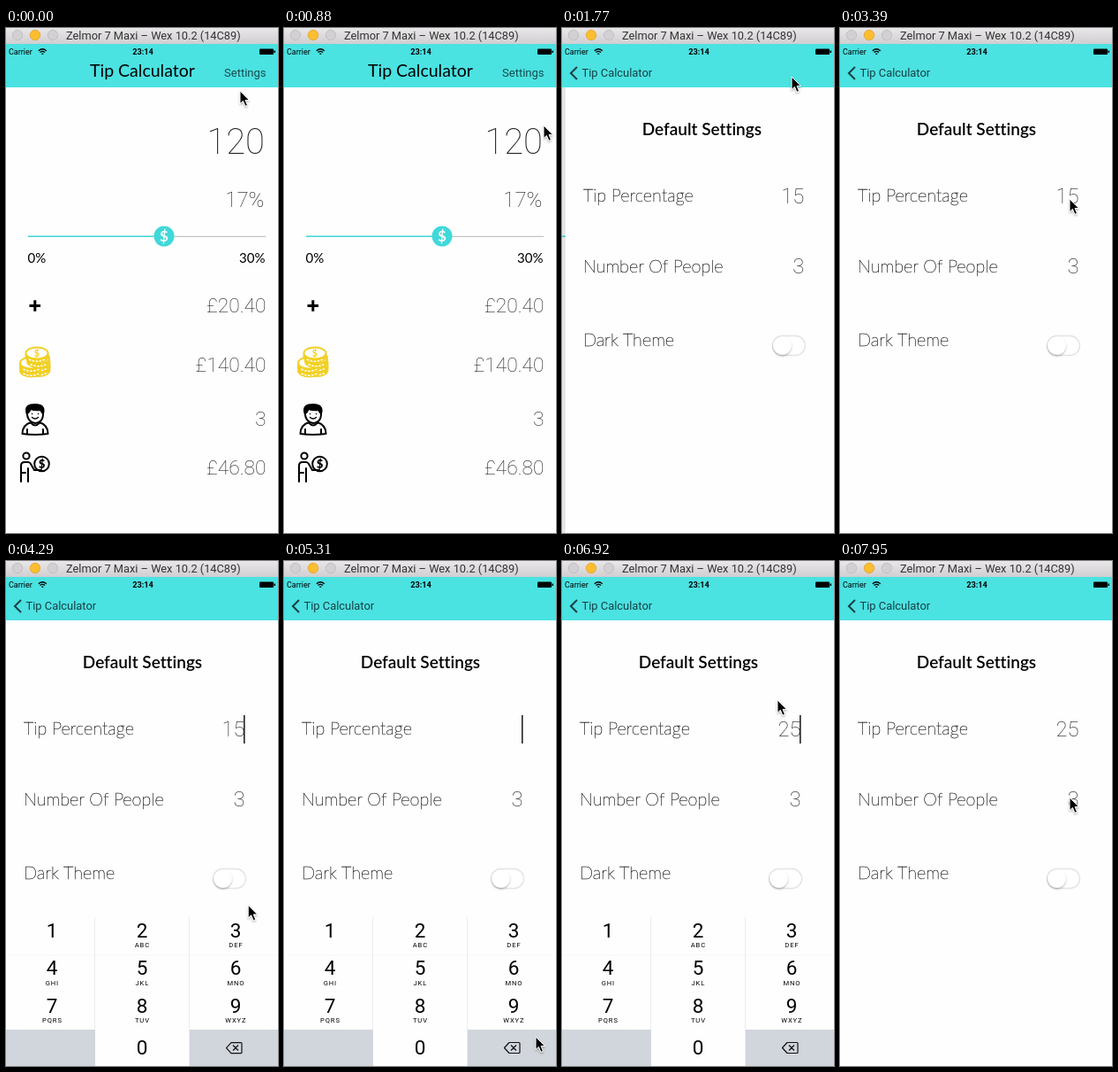
These frames come from a looping animation (308x570 px, 8 s). An HTML page:

```html
<!DOCTYPE html>
<html lang="en">
<head>
<meta charset="utf-8">
<title>Tip Calculator</title>
<style>
html, body { margin: 0; width: 100%; height: 100%; overflow: hidden; background: #fefefe; }
svg { display: block; width: 308px; height: 570px; }
text { fill: #000; white-space: pre; font-variant-ligatures: none; }
.ui { font-family: Roboto, sans-serif; }
.lato { font-family: Lato, sans-serif; }
.number { font: 100 22.8px Roboto, sans-serif; text-anchor: end; fill: #222; }
.field { font-size: 23.8px; }
.label { font: 100 19.9px Lato, sans-serif; fill: #111; stroke: #111; stroke-width: .3; }
.mid { text-anchor: middle; }
.end { text-anchor: end; }
.line { fill: none; stroke: #000; stroke-width: 2; stroke-linecap: round; stroke-linejoin: round; }
</style>
</head>
<body>
<svg viewBox="0 0 308 570">
  <defs>
    <linearGradient id="chrome" x2="0" y2="1">
      <stop stop-color="#e9e7e9"/><stop offset="1" stop-color="#d0ced0"/>
    </linearGradient>
    <linearGradient id="edge">
      <stop stop-opacity="0"/><stop offset="1" stop-opacity=".2"/>
    </linearGradient>
    <filter id="soft" x="-50%" y="-50%" width="200%" height="200%">
      <feDropShadow dx="0" dy="1.5" stdDeviation="1.3" flood-opacity=".3"/>
    </filter>
  </defs>
  <rect width="308" height="570" fill="#fefefe"/>

  <g id="calculator">
    <text class="number" x="293" y="142" style="font-size:40px">120</text>
    <text class="number" x="292.500" y="202" style="font-size:24px">17%</text>
    <path d="M25 235.300H294" stroke="#c4c4c4" stroke-width="1.300"/>
    <path d="M25 235.300H179" stroke="#43d9db" stroke-width="1.600"/>
    <circle cx="179" cy="235" r="11.500" fill="#40d8d9"/>
    <text class="lato mid" x="179" y="241" font-size="17" font-weight="700" style="fill:#fff">$</text>
    <text class="lato" x="24.500" y="264.500" font-size="15">0%</text>
    <text class="lato end" x="293.500" y="264.500" font-size="15">30%</text>
    <path d="M26.500 313.500h12.500m-6.200-6.200v12.500" stroke="#000" stroke-width="3"/>
    <text class="number" x="294.500" y="321">£20.40</text>
    <g id="coins" fill="#fff" stroke="#f2d024" stroke-width="1.800"></g>
    <text class="lato mid" x="35" y="371" font-size="11" font-weight="700" style="fill:#f2d024">$</text>
    <text class="number" x="294.500" y="388">£140.40</text>
    <g class="line">
      <path d="M24 434c-1 15 19 17 18 0"/>
      <path d="M23.500 435c-2-8 2-10 9.500-10s11 3 9 10q-2-1-2.500-4-6 1-12-1-1 4-4 5z" fill="#000"/>
      <path d="M28.500 445c-7 2-10 6-10 13q14 2 29 0c0-7-3-11-10-13M24 453v5m18-5v5M28.500 446q4.500 5 9 0"/>
      <path d="M29.500 439.500q3.500 3 7 0M29.500 435.500h.1m6.900 0h.1" stroke-width="1.500"/>
    </g>
    <text class="number" x="294.500" y="449">3</text>
    <g class="line">
      <circle cx="23" cy="483" r="3.600"/>
      <path d="M17 512v-18q0-4 4-4h4q2 0 3 2l4 7h8M25 497v15M17 502h5"/>
      <circle cx="40.500" cy="492" r="8.300"/>
    </g>
    <text class="lato mid" x="40.500" y="496.500" font-size="12.500" font-weight="900">$</text>
    <text class="number" x="294.500" y="504">£46.80</text>
  </g>
  <rect id="dim" y="67" width="308" height="503"/>

  <g id="settings">
    <rect id="shadow" x="-6" y="67" width="6" height="503" fill="url(#edge)"/>
    <rect y="67" width="308" height="503" fill="#fefefe"/>
    <text class="lato mid" x="154.500" y="121" font-size="19" font-weight="600">Default Settings</text>
    <text class="label" x="20" y="196">Tip Percentage</text>
    <text class="label" x="20" y="275.500">Number Of People</text>
    <text class="label" x="20" y="358.500">Dark Theme</text>
    <text class="number field" id="tip" x="270.500" y="197.500"></text>
    <text class="number field" x="270.500" y="277">3</text>
    <path id="caret" d="M269.800 174V206" stroke="#222" stroke-width="1.600"/>
    <rect x="234.500" y="347.500" width="37" height="22" rx="11" fill="#fff" stroke="#e3e3e3" stroke-width="1.300"/>
    <circle cx="245.500" cy="358.500" r="10.300" fill="#fff" filter="url(#soft)"/>
  </g>

  <g id="keyboard"></g>

  <rect y="18" width="308" height="49" fill="#4be2e2"/>
  <g class="ui">
    <text x="3" y="30" font-size="9">Carrier</text>
    <g fill="none" stroke="#000" stroke-width="1.300">
      <path d="M36.800 25.700q4.500-4 9 0M38.500 27.500q2.800-2.400 5.600 0"/>
      <path d="M40.300 29.200h2"/>
    </g>
    <text class="mid" x="155" y="30" font-size="9.200" font-weight="700">23:14</text>
    <rect x="287" y="23.500" width="16" height="6.500" rx="1"/>
    <rect x="303.500" y="25.500" width="1.500" height="2.500"/>
    <text id="action" class="end" x="294.500" y="55.300" font-size="13" style="fill:#174a4c">Settings</text>
    <g id="back">
      <path d="M17 44l-7 7 7 7" fill="none" stroke="#174043" stroke-width="2"/>
      <text x="22.500" y="55.300" font-size="12.900" style="fill:#174043">Tip Calculator</text>
    </g>
  </g>
  <g id="heading"><text class="lato" font-size="19.500">Tip Calculator</text></g>

  <rect width="308" height="18" fill="url(#chrome)"/>
  <g stroke-width=".8">
    <circle cx="13" cy="8" r="5.700" fill="#d2d0d2" stroke="#bbb9bb"/>
    <circle cx="33" cy="8" r="5.700" fill="#fdbd2f" stroke="#e0a127"/>
    <circle cx="53" cy="8" r="5.700" fill="#d2d0d2" stroke="#bbb9bb"/>
  </g>
  <text class="ui" x="68" y="13" font-size="12.800" style="fill:#333">Zelmor 7 Maxi – Wex 10.2 (14C89)</text>

  <path id="pointer" d="M0 0V14.500L3.400 11.400 5.900 17.300 8.500 16.200 6 10.500H10.500Z" fill="#000" stroke="#fff" stroke-width="1" filter="url(#soft)"/>
</svg>

<script>
const LOOP = 8000;
const PUSH_START = 1422;
const EDIT = [3690, 7250];
const $ = id => document.getElementById(id);
const clamp = v => Math.max(0, Math.min(1, v));
const lerp = (a, b, p) => a + (b - a) * p;
const smooth = p => p * p * (3 - 2 * p);

// time, x, y of the pointer tip
const pointerPath = [
  [0, 265, 71], [300, 217, 150], [600, 240, 240], [880, 294, 110],
  [1050, 274, 34], [1250, 260, 55], [1900, 260, 55], [2360, 285, 215],
  [2650, 289, 233], [3150, 258, 187], [3380, 260, 193], [3800, 260, 193],
  [4700, 285, 537], [5350, 285, 537], [5850, 145, 425], [6150, 150, 425],
  [6380, 154, 462], [6520, 154, 462], [6910, 244, 157], [7220, 236, 135],
  [7400, 236, 135], [7880, 260, 267], [LOOP, 260, 267]
];

// time, field value from then on
const values = [[0, '15'], [4870, '1'], [5160, ''], [6040, '2'], [6340, '25']];

// key, start and end of each press
const presses = [['del', 4870, 5010], ['del', 5160, 5300], ['2', 6040, 6190], ['5', 6340, 6490]];

function buildCoins() {
  const stack = [[37, 382.500], [28.500, 383], [37, 377.500], [28.500, 378], [36.500, 372.500], [35, 367]];
  $('coins').innerHTML = stack.map(([x, y]) =>
    `<path d="M${x - 12.500} ${y}v4a12.500 6.500 0 0 0 25 0v-4" fill="#f2d024"/>
     <path d="M${x - 9} ${y + 7}q9 4.500 18 0" fill="none" stroke="#fff" stroke-width="1.500" stroke-dasharray="2.500 1.500"/>
     <ellipse cx="${x}" cy="${y}" rx="12.500" ry="6.500"/>`).join('');
}

function buildKeyboard() {
  const letters = ['', 'ABC', 'DEF', 'GHI', 'JKL', 'MNO', 'PQRS', 'TUV', 'WXYZ'];
  const columns = [[0, 100.500, 52], [101, 106.500, 154], [208, 100, 260]];
  const keys = [1, 2, 3, 4, 5, 6, 7, 8, 9, '', 0, 'del'];
  $('keyboard').innerHTML = '<rect y="402" width="308" height="168" fill="#d9dbdf"/>' + keys.map((key, i) => {
    const [x, width, center] = columns[i % 3];
    const y = 402 + 42.300 * Math.floor(i / 3);
    const fill = key === '' || key === 'del' ? '#d1d5dc' : '#fefefe';
    const digit = typeof key === 'number' ?
      `<text class="ui mid" x="${center}" y="${y + (key ? 23 : 28)}" font-size="22.500">${key}</text>` : '';
    return `<rect data-key="${key}" data-fill="${fill}" x="${x}" y="${y}" width="${width}" height="42.500"/>${digit}
      <text class="ui mid" x="${center + .4}" y="${y + 34.300}" font-size="7.600" letter-spacing=".9">${letters[i] || ''}</text>`;
  }).join('') +
  `<path d="M249.500 549.500l5.500-6h11q1 0 1 1v10q0 1-1 1h-11zM257 546.500l6 6m0-6l-6 6"
    fill="none" stroke="#111" stroke-width="1.200" stroke-linejoin="round"/>`;
}

// critically damped spring
function spring(ms, rate = .01826) {
  const x = Math.max(0, ms) * rate;
  return 1 - (1 + x) * Math.exp(-x);
}

function pointerAt(t) {
  const i = pointerPath.findIndex(point => point[0] > t);
  const [t0, x0, y0] = pointerPath[i - 1];
  const [t1, x1, y1] = pointerPath[i];
  const p = smooth((t - t0) / (t1 - t0));
  return [lerp(x0, x1, p), lerp(y0, y1, p)];
}

const move = (id, x, y = 0, scale = 1) =>
  $(id).setAttribute('transform', `translate(${x} ${y}) scale(${scale})`);
const fade = (id, opacity) => $(id).setAttribute('opacity', clamp(opacity));

function draw(t) {
  const push = spring(t - PUSH_START);
  move('calculator', -92.400 * push);
  move('settings', 308 * (1 - push));
  fade('settings', push > 0 ? 1 : 0);
  fade('shadow', 1 - push);
  fade('dim', .1 * push);
  fade('action', 1 - 4.100 * push);
  fade('back', (push - .2) * 1.300);
  move('heading', lerp(95, 23, push * .8), lerp(55, 55.300, push), lerp(1, .7, push * .8));
  fade('heading', 1 - 1.800 * push);

  const editing = t >= EDIT[0] && t < EDIT[1];
  const raised = spring(t - EDIT[0]) - spring(t - EDIT[1]);
  move('keyboard', 0, 170 * (1 - raised));
  fade('caret', editing ? 1 : 0);
  $('tip').textContent = values.filter(([start]) => t >= start).pop()[1];
  for (const key of keyRects) {
    const { key: name, fill } = key.dataset;
    const down = presses.some(([k, from, to]) => k === name && t >= from && t < to);
    const pressedFill = name === 'del' ? '#fefefe' : '#d1d5dc';
    key.setAttribute('fill', down ? pressedFill : fill);
  }
  move('pointer', ...pointerAt(t));
}

buildCoins();
buildKeyboard();
const keyRects = document.querySelectorAll('[data-key]');
const start = performance.now();
function tick() {
  draw((performance.now() - start) % LOOP);
  requestAnimationFrame(tick);
}
tick();
</script>
</body>
</html>
```
